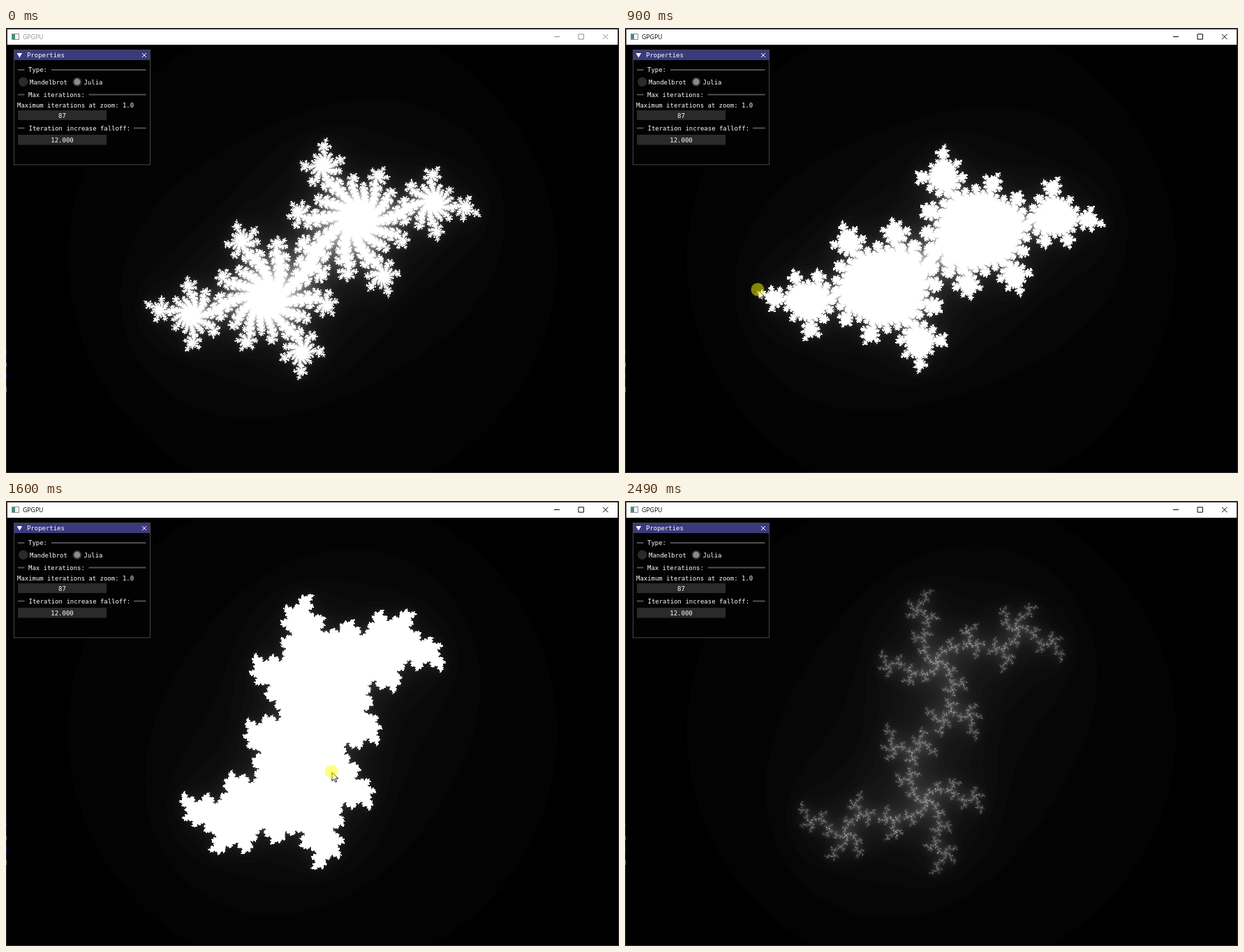
Recreate the animation shown at these times as an HTML page with a canvas. Size 878 px wide and 638 px high, loop 2590 ms.

```html
<!DOCTYPE html>
<html lang="en">
<head>
<meta charset="utf-8">
<title>Julia explorer</title>
<style>
  html, body { margin: 0; width: 100%; height: 100%; overflow: hidden; background: #000; }
  canvas { position: absolute; left: 1px; top: 25px; }
  svg { position: absolute; left: 0; top: 0; }
  .ui { font: 8.96px "DejaVu Sans Mono", monospace; fill: #fff; white-space: pre; }
  .title { font: 8.7px "Open Sans", "Noto Sans", sans-serif; }
  .rule { stroke: #505050; stroke-width: 2; }
  .box { fill: #2a2a2a; }
  #bar { color: #000; }
  #bar.idle { color: #8f8f8f; }
</style>
</head>
<body>
<canvas id="view" width="876" height="612"></canvas>
<svg width="878" height="638" viewBox="0 0 878 638">
  <!-- window frame -->
  <path d="M.5 0V638M877.5 0V638M0 637.5H878M0 .5H878" stroke="#303034" fill="none"/>
  <path d="M.5 462v5M.5 496v6" stroke="#3c4f9c"/>
  <path d="M.5 480v6M.5 515v7" stroke="#85858c"/>
  <rect x="1" y="1" width="876" height="23" fill="#26262a"/>
  <rect x="2" y="2" width="874" height="22" fill="#fff"/>
  <rect x="8.5" y="8.5" width="10" height="8" fill="#f4f4f4" stroke="#8a8f94"/>
  <rect x="9" y="9" width="4" height="7" fill="#3f8f7a"/>
  <g id="bar" class="idle">
    <text class="title" x="24" y="16" fill="currentColor">GPGPU</text>
    <path d="M785 12.5h8M820 8.9h7.4v7.2h-7.4zM855 8.8l7.4 7.4M862.4 8.8l-7.4 7.4" stroke="currentColor" fill="none"/>
  </g>

  <!-- properties panel -->
  <rect x="11.5" y="31.5" width="195" height="164.5" fill="#020202" stroke="#46464c"/>
  <rect x="12" y="32" width="194" height="14" fill="#3a3a7c"/>
  <path d="M15.6 36h7.6l-3.8 6.4z" fill="#fff"/>
  <path d="M195 36l6 6M201 36l-6 6" stroke="#fff"/>
  <path class="rule" d="M17 60h9.5M65 60H200.5M17 95.5h9.5M118.5 95.5H200.5M17 143.5h9.5M183 143.5H200.5"/>
  <circle class="box" cx="24.7" cy="77.2" r="6.7"/>
  <circle class="box" cx="101.9" cy="77.2" r="6.7"/>
  <circle cx="101.9" cy="77.2" r="4.6" fill="#8c8c8c"/>
  <rect class="box" x="17" y="118" width="127" height="14"/>
  <rect class="box" x="17" y="153" width="127" height="14.5"/>
  <g class="ui">
    <text x="30" y="42">Properties</text>
    <text x="32" y="63">Type:</text>
    <text x="34" y="80.5">Mandelbrot</text>
    <text x="111.5" y="80.5">Julia</text>
    <text x="32" y="98.5">Max iterations:</text>
    <text x="16" y="113.5">Maximum iterations at zoom: 1.0</text>
    <text x="80.5" y="128.5" text-anchor="middle">87</text>
    <text x="32.5" y="146.5">Iteration increase falloff:</text>
    <text x="80.5" y="164" text-anchor="middle">12.000</text>
  </g>

  <g id="cursor">
    <path d="M.5 .5V13L3.4 10.3 5.4 14.6 7.3 13.8 5.4 9.5H9.4Z" fill="#fff" stroke="#000" stroke-width=".9"/>
    <circle id="press" cx="-.5" cy="-.5" r="9.5" fill="#ff0" fill-opacity=".5"/>
  </g>
</svg>
<script>
const W = 876, H = 612, SCALE = 175, MAX = 87;
const LOOP = 2590, STEP = 100, LAST = 2300, HIDE = 2490;

// time, Julia constant (re, im), pointer (x, y)
const KEYS = [
  [0, -.4062, .5925, 240, 405],
  [500, -.4185, .570, 235, 400],
  [900, -.546, .482, 190.5, 375.5],
  [1100, -.608, .369, 166, 346],
  [1200, -.519, .395, 198.5, 350],
  [1600, .195, .525, 466.5, 388.5],
  [1900, .3607, .4908, 523, 383],
  [2300, .2756, .619, 492, 413]
];

const $ = id => document.getElementById(id);
const ctx = $("view").getContext("2d");
const cache = new Map();

function stateAt(t) {
  const i = Math.max(1, KEYS.findIndex(k => k[0] >= t));
  const a = KEYS[i - 1], b = KEYS[i];
  const u = (t - a[0]) / (b[0] - a[0]);
  return a.map((v, j) => v + (b[j] - v) * u);
}

function escapeCount(x, y, re, im) {
  let n = 0, xx = x * x, yy = y * y;
  while (n < MAX && xx + yy <= 4) {
    y = 2 * x * y + im;
    x = xx - yy + re;
    xx = x * x;
    yy = y * y;
    n++;
  }
  return n;
}

// The set is symmetric about its centre, so only half is computed.
function julia(re, im) {
  const img = ctx.createImageData(W, H);
  const px = new Uint32Array(img.data.buffer);
  for (let i = 0, end = W * H - 1; i < W * H / 2; i++) {
    const x = (i % W + .5 - W / 2) / SCALE;
    const y = (Math.floor(i / W) + .5 - H / 2) / SCALE;
    const g = Math.round(255 * escapeCount(x, y, re, im) / MAX);
    px[i] = px[end - i] = (0xff000000 | g * 0x10101) >>> 0;
  }
  return img;
}

let shown = -1;
function draw(now) {
  const t = now % LOOP;
  const step = Math.min(LAST, Math.floor(t / STEP) * STEP);
  const [, re, im, x, y] = stateAt(step);
  if (step !== shown) {
    if (!cache.has(step)) cache.set(step, julia(re, im));
    ctx.putImageData(cache.get(step), 0, 0);
    shown = step;
  }
  $("bar").setAttribute("class", step ? "" : "idle");
  $("cursor").setAttribute("transform", `translate(${x} ${y})`);
  $("cursor").setAttribute("visibility", step && t < HIDE ? "visible" : "hidden");
  $("press").setAttribute("display", step < LAST ? "inline" : "none");
}

const start = performance.now();
function tick() {
  draw(performance.now() - start);
  requestAnimationFrame(tick);
}
tick();
</script>
</body>
</html>
```
